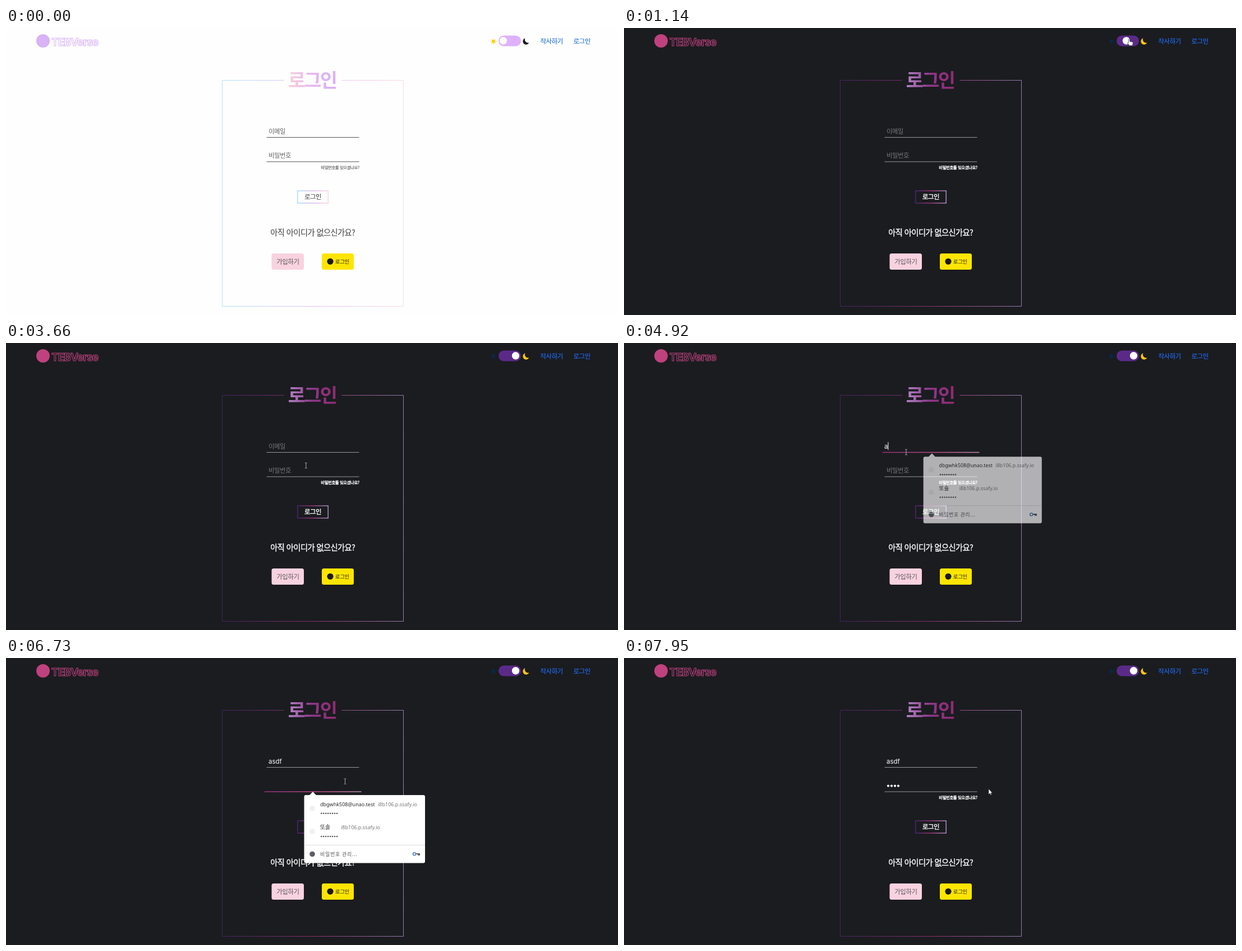
Animation, 1091 px wide and 513 px high, one loop 8000 ms. Source, as an HTML page:

```html
<!DOCTYPE html>
<html lang="ko">
<head>
<meta charset="utf-8">
<title>로그인</title>
<style>
html, body { margin: 0; width: 100%; height: 100%; overflow: hidden; background: #fefefe; }
svg { display: block; width: 1091px; height: 513px; }
#stage {
  --bg: #fefefe; --text: #484848; --hint: #666; --line: #555; --link: #2972dd;
  --g1: #9fdcf7; --g2: #d9b2f8; --g3: #f8d2da;
  --t1: #f9d0da; --t2: #e3b8ee; --t3: #d9b0f9;
  --track: #deb1fa; --sun: #fcd116; --moon: #1b1c1f; --logo: #d9b3f5; --bold: .1px;
}
#stage.dark {
  --bg: #1b1c20; --text: #fff; --hint: #75757a; --line: #98989b; --link: #1f6bf5;
  --g1: #4c2673; --g2: #a6367c; --g3: #b494d2;
  --t1: #b387c6; --t2: #8d3689; --t3: #8f2b70;
  --track: #5b2a89; --sun: #0a2946; --moon: #f6c417; --logo: #c0417f; --bold: .35px;
}
text { font: 11.4px "Noto Sans CJK KR", "Noto Sans CJK", "Noto Sans", sans-serif; letter-spacing: -.04em; white-space: pre; }
.label { fill: var(--text); stroke: var(--text); stroke-width: var(--bold); }
.hint { fill: var(--hint); }
.link { fill: var(--link); stroke: var(--link); stroke-width: .2px; }
.mid { text-anchor: middle; }
.latin { font-family: Inter, sans-serif; letter-spacing: 0; }
#popup text { font: 9px "Noto Sans", "Noto Sans CJK KR", sans-serif; letter-spacing: 0; fill: #777; }
#popup .user { fill: #2a2a2a; }
#popup .footer { letter-spacing: .08em; fill: #555; }
</style>
</head>
<body>
<svg id="stage" viewBox="0 0 1091 513">
  <defs>
    <linearGradient id="brand">
      <stop stop-color="var(--g1)"/><stop offset=".5" stop-color="var(--g2)"/><stop offset="1" stop-color="var(--g3)"/>
    </linearGradient>
    <linearGradient id="heading">
      <stop stop-color="var(--t1)"/><stop offset=".5" stop-color="var(--t2)"/><stop offset="1" stop-color="var(--t3)"/>
    </linearGradient>
    <linearGradient id="focus">
      <stop stop-color="#96307e"/><stop offset=".6" stop-color="#c04f88"/><stop offset="1" stop-color="#bd8fb2"/>
    </linearGradient>
  </defs>

  <rect width="1091" height="513" fill="var(--bg)"/>

  <circle cx="66" cy="23" r="12" fill="var(--logo)"/>
  <text class="latin" x="81" y="32" fill="none" stroke="var(--logo)" style="font-size:19px;font-weight:700;letter-spacing:-.05em">TEBVerse</text>

  <g id="sun" fill="var(--sun)" stroke="var(--sun)" stroke-width="1.1"><circle cx="869" cy="24" r="2.7"/></g>
  <rect x="878" y="13.5" width="40" height="19" rx="9.5" fill="var(--track)"/>
  <circle id="knob" cy="22.7" r="6.7" fill="#fff"/>
  <path d="M925.4 18.3A5.8 5.8 0 1 0 932.4 26.3A5.9 5.9 0 0 1 925.4 18.3Z" fill="var(--moon)"/>
  <text class="link" x="952.6" y="28.2">작사하기</text>
  <text class="link" x="1011.6" y="28.2">로그인</text>

  <path d="M495.5 93.5H385.5V497.5H708.5V93.5H598.5" fill="none" stroke="url(#brand)" opacity=".8"/>
  <text class="mid" x="545.5" y="106" fill="url(#heading)" style="font-size:34px;font-weight:700;letter-spacing:-.08em">로그인</text>

  <g id="fields"></g>
  <text class="label" x="630" y="251.7" text-anchor="end" style="font-size:7.25px">비밀번호를 잊으셨나요?</text>

  <rect x="519.8" y="291" width="54.4" height="22" fill="none" stroke="url(#brand)" stroke-width="1.4"/>
  <text class="label mid" x="547" y="306.2">로그인</text>
  <text class="label mid" x="546.8" y="371.3" style="font-size:14.25px">아직 아이디가 없으신가요?</text>

  <rect x="473.5" y="403" width="57.5" height="29" rx="3.5" fill="#f9d2df"/>
  <text class="mid" x="502.4" y="421.8" fill="#58585c">가입하기</text>
  <rect x="563" y="403" width="57" height="29" rx="3.5" fill="#fee500"/>
  <circle cx="578" cy="417.3" r="5.6" fill="#1c1a08"/>
  <text x="586.8" y="421.1" fill="#2c2a10" style="font-size:9.5px">로그인</text>

  <g id="popup">
    <path d="M534.5 202H541L547 196L553 202H744a3 3 0 0 1 3 3V320.5a3 3 0 0 1-3 3H534.5a3 3 0 0 1-3-3V205a3 3 0 0 1 3-3Z" fill="#fff"/>
    <path d="M531.5 291.3H747" stroke="#dcdcdc"/>
    <circle cx="546" cy="226" r="5" fill="#f1f0f2"/>
    <circle cx="546" cy="267" r="5" fill="#f1f0f2"/>
    <circle cx="546" cy="307.5" r="4.8" fill="#5c5f63"/>
    <text class="user" x="560" y="221.6">dbgwhk508@unao.test</text>
    <text x="663" y="221.6">i8b106.p.ssafy.io</text>
    <text class="user" x="560" y="262.9" style="font-size:9.8px">또솔</text>
    <text x="597" y="262.9">i8b106.p.ssafy.io</text>
    <text class="footer" x="560" y="311">비밀번호 관리...</text>
    <circle cx="728" cy="307.3" r="2.5" fill="none" stroke="#4a80c4" stroke-width="1.6"/>
    <path d="M731 307H738M734.8 307V310M737 307V310" fill="none" stroke="#444" stroke-width="1.6"/>
  </g>

  <g id="cursor">
    <path d="M0 0V9.8L2.2 7.8L3.7 11L5.2 10.3L3.8 7.2H6.7Z" fill="#fff" stroke="#222" stroke-width=".6"/>
    <path d="M-1.2 1.2Q0-.4 1.2 1.2V5L6 6.1Q7 6.5 6.9 7.8L6 12.6H.6L-2.7 8.4Q-3.2 6.9-1.2 7.4Z" fill="#fff" stroke="#222" stroke-width=".7"/>
    <path d="M-2-4.8H-.6L0-4.2L.6-4.8H2M0-4.2V4.2M-2 4.8H-.6L0 4.2L.6 4.8H2" fill="none" stroke="#aaa" stroke-width="1"/>
  </g>
</svg>
<script>
const LOOP = 8000, DARK_AT = 1135;
const ARROW = 0, HAND = 1, BEAM = 2;

// time, x, y of the pointer
const path = [
  [0, 1074, 525], [680, 900.5, 19], [1730, 900.5, 19], [2440, 583.5, 197],
  [3105, 583.5, 197], [3180, 706, 167], [3260, 712, 157.5], [3660, 534.8, 219],
  [3910, 506, 201], [3980, 506, 201], [4055, 505.5, 187], [4650, 505.5, 187],
  [4860, 503, 195], [5150, 503, 195], [5450, 650, 155.5], [5540, 650, 155.5],
  [6050, 603, 222], [6590, 603, 222], [6725, 604.5, 220.5], [7190, 604.5, 220.5],
  [7470, 694, 208.5], [7740, 694, 208.5], [7945, 650, 234]
];
const knobPath = [[1085, 886.5], [1140, 895.3], [1210, 905.5], [1270, 908.5]];
const popups = [
  { from: 2610, to: 3260, dy: 0 }, { from: 4280, to: 4870, dy: 0 }, { from: 6090, to: 6930, dy: 43 }
];
const fields = [
  { y: 195.5, top: 174, hint: '이메일', value: 'asdf', focus: [[2600, 3260], [4250, 5540]], keys: [4870, 4990, 5060, 5130] },
  { y: 239, top: 213, hint: '비밀번호', value: '', focus: [[6080, 7740]], keys: [6930, 7050, 7130, 7230] }
];

const $ = id => document.getElementById(id);
const clamp = v => Math.min(1, Math.max(0, v));
const smooth = v => v * v * (3 - 2 * v);
const linear = v => v;

function set(el, attrs) {
  for (const name in attrs) el.setAttribute(name, attrs[name]);
  return el;
}
function add(parent, tag, attrs) {
  return parent.appendChild(set(document.createElementNS('http://www.w3.org/2000/svg', tag), attrs));
}
function show(el, on) { el.style.display = on ? '' : 'none'; }

function sample(table, t, ease) {
  let i = 0;
  while (i < table.length - 1 && table[i + 1][0] <= t) i++;
  const a = table[i], b = table[i + 1] || a;
  const k = ease(a === b ? 0 : clamp((t - a[0]) / (b[0] - a[0])));
  return a.map((v, n) => v + (b[n] - v) * k);
}

for (let i = 0; i < 8; i++) {
  add($('sun'), 'path', { d: 'M869 19.7V18.4', transform: `rotate(${i * 45} 869 24)` });
}
for (const y of [234.7, 276]) {
  for (let i = 0; i < 8; i++) add($('popup'), 'circle', { cx: 562.3 + i * 3.95, cy: y, r: 1.3, fill: '#555' });
}
for (const f of fields) {
  const root = $('fields');
  f.line = add(root, 'rect', {});
  f.hintText = add(root, 'text', { class: 'hint', y: f.y - 6.8 });
  f.hintText.textContent = f.hint;
  f.text = add(root, 'text', { class: 'latin', y: f.y - 7, fill: '#fff', 'font-weight': 500 });
  f.dots = f.keys.map(() => add(root, 'circle', { cy: f.y - 10.4, r: 2.1, fill: '#fff' }));
  f.caret = add(root, 'rect', { y: f.y - 18.3, width: 1, height: 14, fill: '#fff' });
}

function drawField(f, t) {
  const active = f.focus.find(([a, b]) => t >= a && t < b);
  const grow = Math.max(...f.focus.map(([a, b]) => smooth(clamp((t - a) / 180) * clamp(1 - (t - b) / 150))));
  const left = 468 - 4 * grow;
  const pressed = f.keys.filter(k => k <= t);
  const thick = 1 + .5 * grow;
  set(f.line, {
    x: 464.5 - 4 * grow, width: 165 + 8 * grow, y: f.y - thick / 2, height: thick,
    fill: grow > 0 ? 'url(#focus)' : 'var(--line)'
  });
  f.hintText.setAttribute('x', left);
  show(f.hintText, !active && !pressed.length);
  f.text.setAttribute('x', left);
  f.text.textContent = f.value.slice(0, pressed.length);
  f.dots.forEach((dot, i) => {
    dot.setAttribute('cx', left + 3 + i * 6);
    show(dot, !f.value && i < pressed.length);
  });
  const width = f.value ? f.text.getComputedTextLength() : pressed.length * 6;
  const reset = active ? Math.max(active[0], ...pressed) : 0;
  f.caret.setAttribute('x', left + width);
  show(f.caret, active && (t - reset) % 1000 < 500);
}

function drawPopup(t) {
  const p = popups.find(q => t >= q.from && t < q.to + 150);
  show($('popup'), p);
  if (!p) return;
  const alpha = clamp((t - p.from) / 170) * clamp(1 - (t - p.to) / 150);
  set($('popup'), {
    opacity: alpha,
    transform: `translate(639 ${262.5 + p.dy}) scale(${.94 + .06 * alpha}) translate(-639 -262.5)`
  });
}

function cursorShape(x, y) {
  if (x > 878 && x < 918 && y < 33) return HAND;
  const overField = fields.some(f => x > 461 && x < 634 && y > f.top && y < f.y + 3);
  return overField ? BEAM : ARROW;
}

function drawCursor(t) {
  const [, x, y] = sample(path, t, smooth);
  const shape = cursorShape(x, y);
  $('cursor').setAttribute('transform', `translate(${x} ${y})`);
  [...$('cursor').children].forEach((el, n) => show(el, n === shape));
}

function draw(t) {
  $('stage').classList.toggle('dark', t >= DARK_AT);
  $('knob').setAttribute('cx', sample(knobPath, t, linear)[1]);
  fields.forEach(f => drawField(f, t));
  drawPopup(t);
  drawCursor(t);
}

const start = performance.now();
function tick() {
  draw((performance.now() - start) % LOOP);
  requestAnimationFrame(tick);
}
tick();
</script>
</body>
</html>
```
